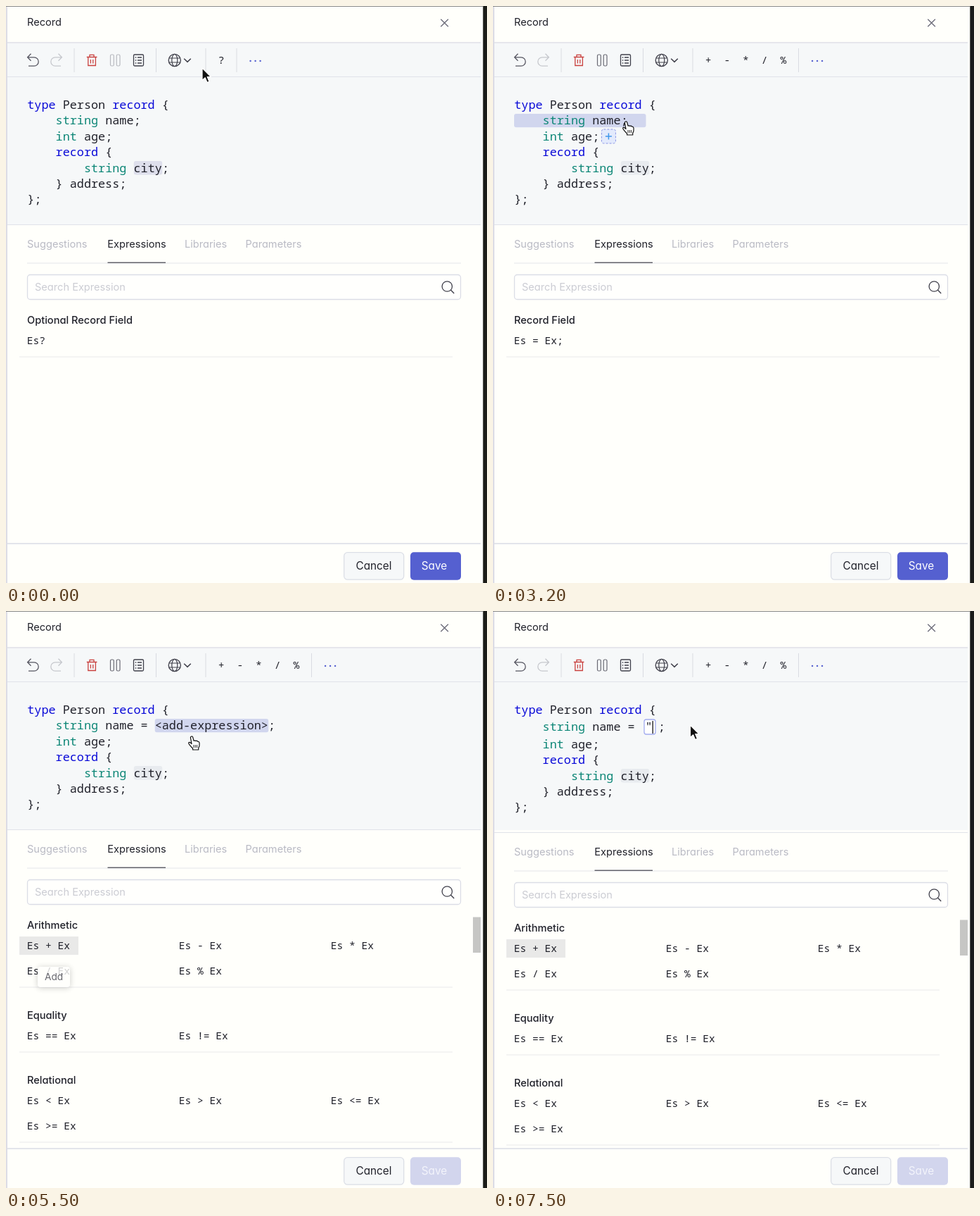
Recreate the animation shown at these times as an HTML page. Size 684 by 819 pixels, loop 8 s.

```html
<!DOCTYPE html>
<html lang="en">
<head>
<meta charset="utf-8">
<title>Record editor</title>
<style>
  html, body { margin: 0; width: 100%; height: 100%; overflow: hidden; background: #fffffb; }
  svg { display: block; width: 684px; height: 819px; }
  text { white-space: pre; font: 14.6px Inter, "Open Sans", sans-serif; font-feature-settings: "cv11"; }
  .mono { font-family: "Noto Sans Mono", "DejaVu Sans Mono", monospace; }
  .tip { filter: drop-shadow(0 1px 4px rgba(0, 0, 0, .25)); }
</style>
</head>
<body>
<svg id="stage" viewBox="0 0 684 819"></svg>
<script>
const LOOP = 8000, STEP = 100;
const INK = '#20212a', DARK = '#40404b', GREY = '#b9bac4', LINE = '#e0e2e9';
const BLUE = '#0a0ad8', TEAL = '#0c8676', ACCENT = '#5560d0', PANEL = '#f6f8f9';
const CODE = 16.8, ADV = CODE * 0.6, LEFT = 30.3;
const stage = document.getElementById('stage');

const esc = s => s.replace(/&/g, '&amp;').replace(/</g, '&lt;');
const rect = (x, y, w, h, fill, extra = '') =>
  `<rect x="${x}" y="${y}" width="${w}" height="${h}" fill="${fill}" ${extra}/>`;
const path = (d, stroke, width = 1.3, extra = 'fill="none"') =>
  `<path d="${d}" stroke="${stroke}" stroke-width="${width}" ${extra}/>`;
const label = (s, x, y, fill = INK, style = '') =>
  `<text x="${x}" y="${y}" fill="${fill}" style="${style}">${esc(s)}</text>`;
const mono = (s, x, y, fill = INK, size = 14.6) =>
  `<text class="mono" x="${x}" y="${y}" fill="${fill}" style="font-size:${size}px">${esc(s)}</text>`;
const shift = (dx, dy, body) => `<g transform="translate(${dx} ${dy})">${body}</g>`;
const within = (t, a, b) => t >= a && t < b;

// cursor track: time, x, y
const TRACK = [
  [400, 279, 88], [500, 284, 97], [700, 238, 140], [900, 160, 186], [1000, 143, 192],
  [1200, 172, 170], [1300, 177, 162], [1500, 183, 162], [1800, 183, 162], [1900, 184, 163],
  [3200, 184, 163], [3300, 175, 205], [3500, 100, 400], [3600, 83, 434], [3800, 83, 434],
  [4000, 64, 464], [4300, 47, 475], [5300, 47, 475], [5400, 150, 320], [5500, 259, 177],
  [5600, 279, 160], [5700, 283, 157], [6000, 275, 161]
];

function trackAt(t) {
  const i = TRACK.findIndex(k => k[0] >= t);
  if (i === 0) return TRACK[0].slice(1);
  if (i < 0) return TRACK[TRACK.length - 1].slice(1);
  const [t0, x0, y0] = TRACK[i - 1], [t1, x1, y1] = TRACK[i];
  const f = (t - t0) / (t1 - t0);
  return [x0 + (x1 - x0) * f, y0 + (y1 - y0) * f];
}

function arrow(x, y) {
  return shift(x, y, path('M0 0V17.5L4.2 13.8 7 20.6 10 19.3 7.2 12.6H12.4Z', '#fff', 1.2, 'fill="#111" stroke-linejoin="round"'));
}

function hand(x, y) {
  return shift(x, y,
    path('M5 11.5L3.4 2.8a1.7 1.7 0 0 1 3.3-.7L8 7.2q1.6-1 2.8.3 1.7-.8 2.6.6 2.3-.2 2.6 2V13.5q0 2-1.3 3.6V20H6.6V18Q4 15.6 1.2 11.8 0 9.8 1.6 9.4 3 9.2 5 11.5Z',
      '#111', 1.2, 'fill="#fff" stroke-linejoin="round"') +
    path('M8 13v4M10.3 13v4M12.6 13v4', '#111', 0.9));
}

function beam(x, y) {
  const d = 'M-3.5-8Q0-8 0-6Q0-8 3.5-8M0-6V7M-3.5 9Q0 9 0 7Q0 9 3.5 9M-2 2H2';
  return shift(x, y, path(d, '#fff', 2.6) + path(d, '#111', 1.2));
}

function cursor(t) {
  if (t >= 7500) return arrow(280.5, 162);
  if (t >= 6400) return beam(281, 163);
  const [x, y] = trackAt(t);
  return t < 800 ? arrow(x, y) : hand(x, y);
}

function frame() {
  return rect(0, 0, 684, 819, '#fffffb') +
    rect(2, 53, 673, 258, PANEL) +
    rect(2, 51.2, 673, 1.6, LINE) + rect(2, 100, 673, 1, LINE) +
    label('Record', 30, 27.5) +
    path('M618.3 18.7l10.6 10.6m0-10.6l-10.6 10.6', '#6b6b78', 1.3);
}

function toolbar(selected) {
  const seps = [97, 213.5, 284, selected ? 434.5 : 328];
  const ops = selected ? ['+', '-', '*', '/', '%'] : ['?'];
  const dots = selected ? 454.5 : 348;
  const undo = 'M35.5 67.8L30.6 72.8 35.5 77.8M30.6 72.8H40A6.2 6.2 0 0 1 40 85.2H32';
  const bars = selected ? '#6a6a74' : '#b8b9bf';
  const rows = [73, 77, 81].map(y => `M183.8 ${y}h1.5M187 ${y}h6`).join('');
  return seps.map(x => rect(x - 0.5, 60, 1, 34, '#d9dbe2')).join('') +
    path(undo, '#555560') +
    `<g transform="translate(110 0) scale(-1 1)">${path(undo, '#c6c8cd')}</g>` +
    path('M114.8 72.5h14.6M119 72.5v-3.2h6v3.2M116.8 72.5v12h10.6v-12M120.4 76v5.5M123.8 76v5.5', '#c9413f') +
    [148.5, 157.2].map(x => rect(x, 69, 4.8, 16, 'none', `rx="1.8" stroke="${bars}" stroke-width="1.2"`)).join('') +
    rect(181.5, 69, 14, 16, 'none', `rx="1.5" stroke="${DARK}" stroke-width="1.3"`) + path(rows, DARK) +
    `<circle cx="239.8" cy="77" r="8.6" fill="none" stroke="${DARK}" stroke-width="1.3"/>` +
    `<ellipse cx="239.8" cy="77" rx="4" ry="8.6" fill="none" stroke="${DARK}" stroke-width="1.2"/>` +
    path('M232 74h15.6M232 80h15.6', DARK, 1.2) +
    path('M253.2 74.8l4.8 4.6 4.8-4.6', DARK, 1.5) +
    ops.map((s, i) => mono(s, 301.7 + i * 26.7, 81.8)).join('') +
    [0, 7, 14].map(d => `<circle cx="${dots + d - 0.4}" cy="78" r="1.2" fill="${ACCENT}"/>`).join('');
}

function plus(x, y) {
  return rect(x, y, 20, 20, '#e3eafc', 'rx="3" stroke="#8b95e6" stroke-dasharray="3 2"') +
    path(`M${x + 5.5} ${y + 10}h9m-4.5-4.5v9`, '#3f97ea', 1.5);
}

function code(t) {
  const selected = t >= 2100, added = t >= 5000, edit = t >= 6500, typed = t >= 7500;
  const at = col => LEFT + col * ADV;
  const base = row => 145.7 + row * 22.45 + (edit ? Math.min(row, 2) * 2 : 0);
  const put = (row, col, s, fill = INK) => mono(s, at(col), base(row), fill, CODE);
  let out = rect(181.8, base(4) - 15.4, 40.4, 19.5, selected ? '#e8ebef' : '#dedfec', 'rx="3"');

  if (selected && !added) out += rect(30, 153, 187.5, 19.3, '#d1d6ee', 'rx="3"');
  if (added && !edit) out += rect(211.7, 153, 161.5, 19.3, '#d1d6ee', 'rx="3"');

  out += put(0, 0, 'type', BLUE) + put(0, 5, 'Person') + put(0, 12, 'record', BLUE) + put(0, 19, '{') +
    put(1, 4, 'string', TEAL) + put(1, 11, added ? 'name =' : 'name;') +
    put(2, 4, 'int', TEAL) + put(2, 8, 'age;') +
    put(3, 4, 'record', BLUE) + put(3, 11, '{') +
    put(4, 8, 'string', TEAL) + put(4, 15, 'city;') +
    put(5, 4, '} address;') + put(6, 0, '};');

  if (edit) {
    const w = typed ? 16 : 105;
    out += rect(215, 154, w, 21, '#fff', 'rx="3" stroke="#a3acf0" stroke-width="1.3"') +
      mono(';', 218.8 + w, base(1), INK, CODE);
    if (typed) out += mono('"', 216.6, base(1), INK, CODE);
    if (typed || t < 7000) out += rect(typed ? 226.6 : 216.6, 156, 1.2, 18, '#000');
  } else if (added) {
    out += put(1, 18, '<add-expression>;');
  }
  if (within(t, 1200, 3200)) out += plus(194.6, 152.6);
  if (within(t, 800, 1200) || t === 3200) out += plus(154.4, 175);
  return out;
}

function group(title, y, items, bottom) {
  return label(title, 30, y, INK, 'font-weight:500') +
    items.map((s, i) => mono(s, 29.8 + (i % 3) * 216, y + 28.8 + Math.floor(i / 3) * 36)).join('') +
    rect(19, bottom, 616, 1, '#e9e9eb');
}

function list(t) {
  if (t < 2100) return group('Optional Record Field', 451, ['Es?'], 497.5);
  const held = '#e9e9e8';
  if (t < 5000) {
    const bg = t >= 4000 ? rect(19, 462, 92, 26, t < 4700 ? '#f4f4f1' : held) : '';
    return bg + group('Record Field', 451, ['Es = Ex;'], 497.5);
  }
  return rect(19, 462, 84, 26, held) +
    group('Arithmetic', 451, ['Es + Ex', 'Es - Ex', 'Es * Ex', 'Es / Ex', 'Es % Ex'], 533.5) +
    group('Equality', 579, ['Es == Ex', 'Es != Ex'], 625.5) +
    group('Relational', 670.8, ['Es < Ex', 'Es > Ex', 'Es <= Ex', 'Es >= Ex'], 753.5) +
    rect(664, 434.5, 11, 50.5, '#c6c6c4');
}

function lower(t) {
  const tabs = [['Suggestions', 30], ['Expressions', 144.3], ['Libraries', 254], ['Parameters', 340.5]];
  const body = rect(2, 310, 673, 1, LINE) +
    tabs.map(([s, x], i) => label(s, x, 343.2, i === 1 ? INK : GREY)).join('') +
    rect(30, 364.5, 617, 1, '#e4e5ea') + rect(144.5, 363.6, 82.5, 1.2, DARK) +
    rect(30.5, 381.5, 616, 35, '#fffffd', 'rx="4" stroke="#dbdde6" stroke-width="1.3"') +
    label('Search Expression', 41, 404.2, '#cbccd3') +
    `<circle cx="627.3" cy="398" r="7.2" fill="none" stroke="${DARK}" stroke-width="1.3"/>` +
    path('M632.4 403.1l4.8 4.8', DARK, 1.4) + list(t);
  return shift(0, t >= 6500 ? 4 : 0, body);
}

function footer(disabled) {
  const btn = 'font-size:15.3px;text-anchor:middle';
  return rect(2, 762.2, 673, 1.8, LINE) +
    rect(480.7, 775.7, 85, 38.5, PANEL, 'rx="5" stroke="#dcdfe6" stroke-width="1.3"') +
    label('Cancel', 523, 800.4, INK, btn) +
    rect(575, 775.3, 72, 39.4, disabled ? '#d2d5ed' : ACCENT, 'rx="5"') +
    label('Save', 609, 800.4, disabled ? '#f3f4fb' : '#fff', btn) +
    rect(0, 0, 2, 819, '#dcdce6') +
    rect(678.3, 0, 5.7, 819, '#1b1c18') + rect(0, 0, 678, 1, '#8a8a88');
}

function tooltip(s, x, w, textX, opacity) {
  return `<g class="tip" opacity="${opacity}">${rect(x, 505, w, 29, '#fffffd', 'rx="4"')}` +
    `${label(s, textX, 524.2, DARK, 'font-size:13.7px')}</g>`;
}

function tips(t) {
  if (within(t, 4200, 5000)) return tooltip('Default Value', -7, 106.5, 3, t < 4300 ? 0.6 : 1);
  if (within(t, 5100, 5600)) return tooltip('Add', 45, 46, 55, t < 5500 ? 1 : 0.8);
  return '';
}

let last = -1;
function tick(now) {
  const t = Math.floor((now % LOOP) / STEP) * STEP;
  if (t !== last) {
    last = t;
    stage.innerHTML = frame() + toolbar(t >= 2100) + code(t) + lower(t) + footer(t >= 5000) + tips(t) + cursor(t);
  }
  requestAnimationFrame(tick);
}
tick(0);
</script>
</body>
</html>
```
